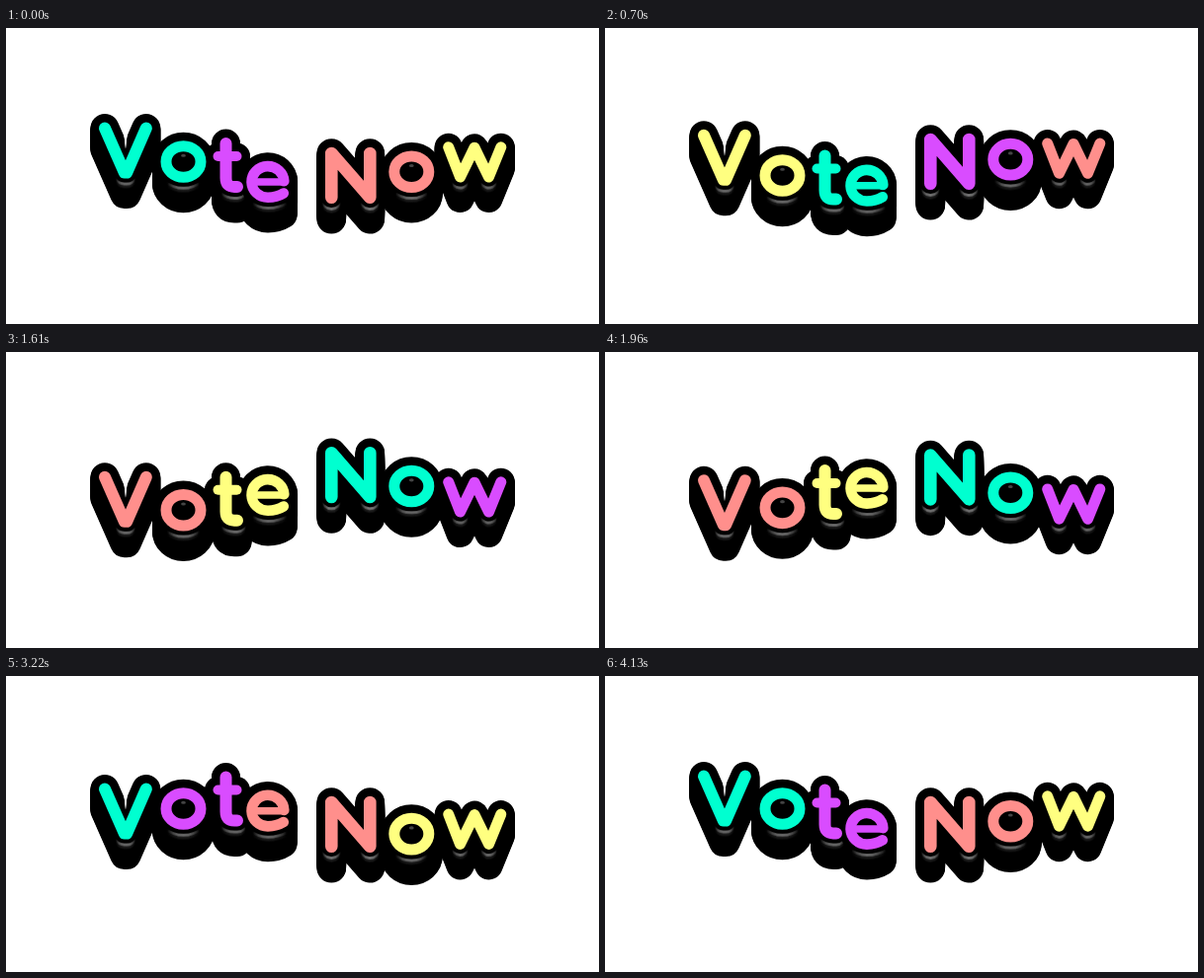
Animation of 600x300 px, one loop 4.2 s. Source, as an HTML page with a canvas:

```html
<!DOCTYPE html>
<html lang="en">
<head>
<meta charset="utf-8">
<title>Vote Now</title>
<style>
  html, body { margin: 0; width: 100%; height: 100%; overflow: hidden; background: #fff; }
  canvas { display: block; }
</style>
</head>
<body>
<canvas id="stage" width="600" height="300" role="img" aria-label="Vote Now">Vote Now</canvas>
<script>
const ctx = document.getElementById('stage').getContext('2d');

const STEP = 70, STEPS = 60;
const SWING = 14.5;      // height of the wave
const RIM = 17;          // black outline, both sides together
const BEVEL = 8;         // flat part of the outline, above the lit edge
const DEPTH = 22;        // length of the extrusion
const COLORS = ['#00ffd0', '#d94cff', '#ff8f8c', '#ffff80'];
const SHINE = [100, 120, 95, 34, 24, 14];

const ring = x => `M${x - 17.5} 145.7a17.5 15.8 0 1 1 35 0a17.5 15.8 0 1 1 -35 0Z`;

// Rounded letters as [stroke width, path]; slot is the place in the phrase, space included.
const letters = [
  { slot: 0, strokes: [[12, 'M100 116L119.8 161H122.2L141.8 116']],
    notch: 'M115.5 106Q119.5 118 121 137Q122.5 118 126.5 106Z' },
  { slot: 1, strokes: [[11, ring(179.5)]], dot: 179.5 },
  { slot: 2, strokes: [[12, 'M222.5 117V152Q222.5 161 231 161H234'],
                       [10, 'M214.5 130H233.5']] },
  { slot: 3, strokes: [[10.6, 'M281.3 145A16.4 15.8 0 1 0 265 161.5Q274 161.5 280.8 157.2'],
                       [7.5, 'M250 145.8H281']] },
  { slot: 5, strokes: [[12.6, 'M329.3 161.5V116.7L368.3 161.5V116.7']] },
  { slot: 6, strokes: [[11, ring(410.3)]], dot: 410.3 },
  { slot: 7, strokes: [[11, 'M447.7 131L459.5 161.3L474 131.5L488.5 161.3L500.8 131']] }
];
for (const l of letters) {
  l.strokes = l.strokes.map(([w, d]) => [w, new Path2D(d)]);
  if (l.notch) l.notch = new Path2D(l.notch);
}

// Light only catches the lower edge of each letter.
const shades = SHINE.map(v => {
  const g = ctx.createLinearGradient(0, 165.5, 0, 171);
  g.addColorStop(0, '#000');
  g.addColorStop(1, `rgb(${v},${v},${v})`);
  return g;
});

ctx.lineCap = ctx.lineJoin = 'round';

function trace(letter, dy, color, extra) {
  ctx.save();
  ctx.translate(0, dy);
  ctx.strokeStyle = color;
  for (const [width, path] of letter.strokes) {
    ctx.lineWidth = width + extra;
    ctx.stroke(path);
  }
  ctx.restore();
}

function fill(path, dy, color) {
  ctx.save();
  ctx.translate(0, dy);
  ctx.fillStyle = color;
  ctx.fill(path);
  ctx.restore();
}

function dot(x) {
  const path = new Path2D();
  path.ellipse(x, 139.5, 2.4, 1.6, 0, 0, 2 * Math.PI);
  return path;
}

function draw(step) {
  const angle = 2 * Math.PI * step / STEPS;
  const shift = Math.ceil(step / 7.5);
  const lift = l => -SWING * Math.cos(angle + l.slot * Math.PI / 4);

  ctx.fillStyle = '#fff';
  ctx.fillRect(0, 0, 600, 300);

  for (const l of letters) {
    for (let k = DEPTH; k >= 0; k--) trace(l, lift(l) + k, '#000', RIM);
    if (l.notch) fill(l.notch, lift(l), '#fff');
  }
  for (const l of letters) {
    for (let k = SHINE.length; k > 0; k--) trace(l, lift(l) + k, shades[k - 1], BEVEL);
    trace(l, lift(l), '#000', BEVEL);
    if (l.notch) fill(l.notch, lift(l), '#fff');
  }
  letters.forEach((l, i) => {
    if (l.dot) fill(dot(l.dot), lift(l), '#444');
    const pair = Math.floor((i - shift) / 2);
    trace(l, lift(l), COLORS[(pair + 8) % 4], 0);
  });
}

let shown = -1;
const start = performance.now();
function tick() {
  const step = Math.floor((performance.now() - start) / STEP) % STEPS;
  if (step !== shown) draw(shown = step);
  requestAnimationFrame(tick);
}
tick();
</script>
</body>
</html>
```
